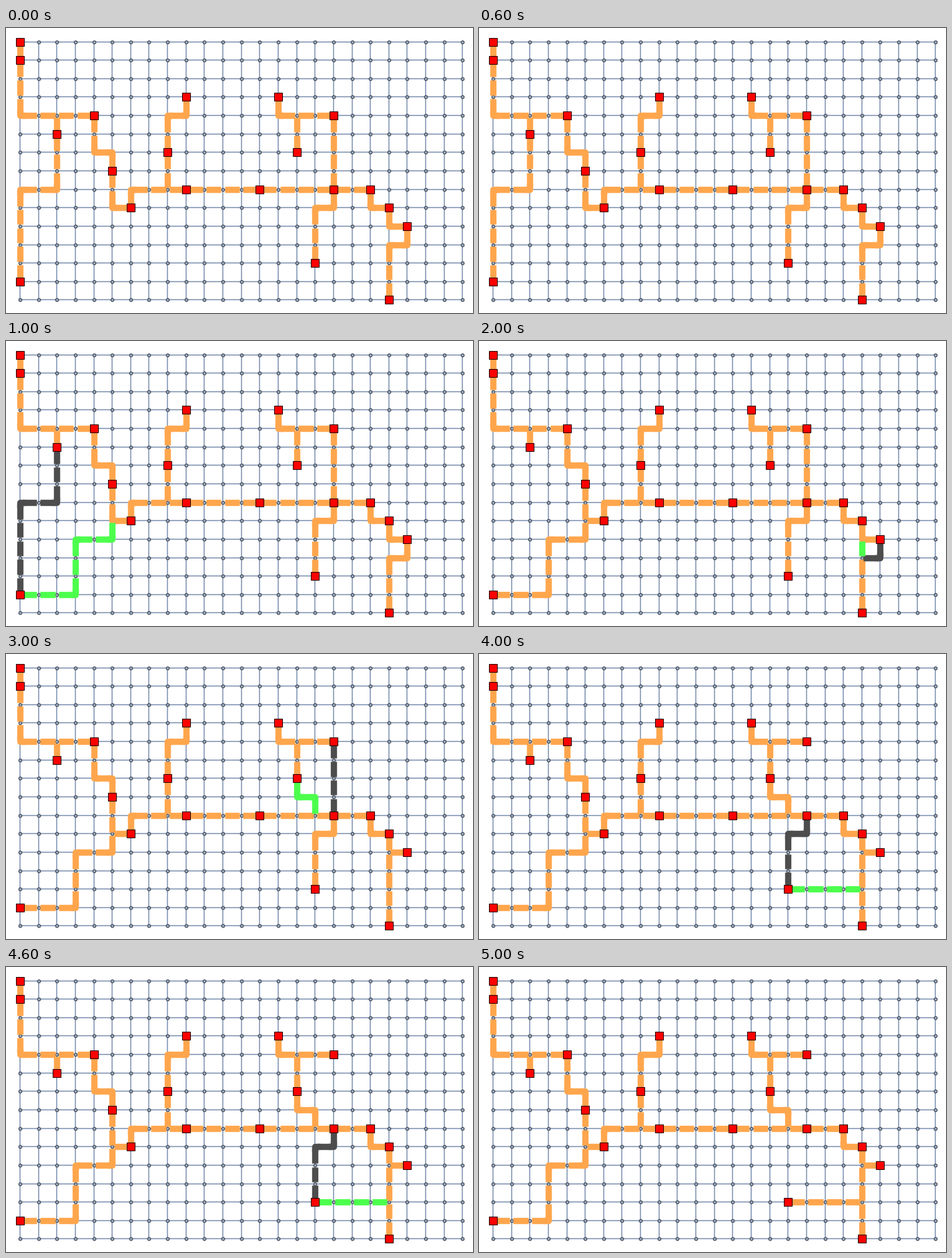
Animation, 700 px wide and 427 px high, one loop 6000 ms. Source, as a matplotlib script:

```python
import matplotlib.pyplot as plt
from matplotlib.animation import FuncAnimation
from matplotlib.collections import LineCollection

W, H, DPI = 700, 427, 64  # a power of two keeps the pixel size exact
PT = 72 / DPI
COLS, ROWS, STEP = 25, 15, 27.64
X0, Y0 = 21.0, 20.5
ORANGE, GREEN, DARK = "#ffa64d", "#4dff4d", "#4d4d4d"
TRIM = 2.6

# Polylines in grid coordinates (column, row)
FIXED = [
    [(0, 0), (0, 4), (4, 4), (4, 6), (5, 6), (5, 9), (6, 9), (6, 8),
     (19, 8), (19, 9), (20, 9), (20, 10), (21, 10)],
    [(2, 4), (2, 5)],
    [(9, 3), (9, 4), (8, 4), (8, 8)],
    [(14, 3), (14, 4), (17, 4)],
    [(15, 4), (15, 6)],
    [(20, 11), (20, 14)],
]
# Each step replaces the first path by the second
SWAPS = [
    ([(2, 5), (2, 8), (0, 8), (0, 13)],
     [(0, 13), (3, 13), (3, 10), (5, 10), (5, 9)]),
    ([(21, 10), (21, 11), (20, 11)], [(20, 10), (20, 11)]),
    ([(17, 4), (17, 8)], [(15, 6), (15, 7), (16, 7), (16, 8)]),
    ([(17, 8), (17, 9), (16, 9), (16, 12)], [(16, 12), (20, 12)]),
]
TERMINALS = [(0, 0), (0, 1), (9, 3), (14, 3), (4, 4), (17, 4), (2, 5),
             (8, 6), (15, 6), (5, 7), (9, 8), (13, 8), (17, 8), (19, 8),
             (6, 9), (20, 9), (21, 10), (16, 12), (0, 13), (20, 14)]


def pos(c, r):
    return X0 + c * STEP, Y0 + r * STEP


def shift(node, d, dist):
    x, y = pos(*node)
    return x + d[0] * dist, y + d[1] * dist


def sign(v):
    return (v > 0) - (v < 0)


def unit_edges(path):
    for (c, r), (c2, r2) in zip(path, path[1:]):
        dc, dr = sign(c2 - c), sign(r2 - r)
        while (c, r) != (c2, r2):
            yield (c, r), (dc, dr)
            c, r = c + dc, r + dr


def strokes(paths):
    """Short bars along the edges, joined only where a path bends."""
    out, around = [], {}
    for path in paths:
        for node, d in unit_edges(path):
            out.append([shift(node, d, TRIM), shift(node, d, STEP - TRIM)])
            end = node[0] + d[0], node[1] + d[1]
            around.setdefault(node, []).append(d)
            around.setdefault(end, []).append((-d[0], -d[1]))
    for node, dirs in around.items():
        if len(dirs) == 2:
            a, b = dirs
            if a[0] * b[0] + a[1] * b[1] == 0:
                out.append([shift(node, a, 8), pos(*node), shift(node, b, 8)])
    return out


fig = plt.figure(figsize=(W / DPI, H / DPI), dpi=DPI, facecolor="white")
ax = fig.add_axes([0, 0, 1, 1])
ax.set_xlim(0, W)
ax.set_ylim(H, 0)
ax.axis("off")

grid = [[pos(c, 0), pos(c, ROWS - 1)] for c in range(COLS)]
grid += [[pos(0, r), pos(COLS - 1, r)] for r in range(ROWS)]
ax.add_collection(LineCollection(grid, colors="#7c90b0",
                                 linewidths=1.5 * PT, zorder=1))
nodes = [pos(c, r) for c in range(COLS) for r in range(ROWS)]
ax.plot(*zip(*nodes), "o", ms=4.6 * PT, mfc="#a3adba", mec="#3f4a5c",
        mew=1.2 * PT, zorder=2)


def layer(color, z):
    lines = LineCollection([], colors=color, linewidths=9.4 * PT, zorder=z,
                           capstyle="butt", joinstyle="round")
    return ax.add_collection(lines)


tree, removed, added = layer(ORANGE, 3), layer(DARK, 4), layer(GREEN, 5)
ax.plot(*zip(*[pos(*t) for t in TERMINALS]), "s", ms=12.4 * PT, mfc="#ff0000",
        mec="#2a0000", mew=1.1 * PT, zorder=6)


def draw(i):
    kept, old, new = list(FIXED), [], []
    for k, (before, after) in enumerate(SWAPS, 1):
        if k == i:
            old.append(before)
            new.append(after)
        else:
            kept.append(after if k < i else before)
    tree.set_segments(strokes(kept))
    removed.set_segments(strokes(old))
    added.set_segments(strokes(new))
    return tree, removed, added


anim = FuncAnimation(fig, draw, frames=6, interval=1000, repeat=True,
                     repeat_delay=0, init_func=lambda: draw(0))
plt.show()
```
